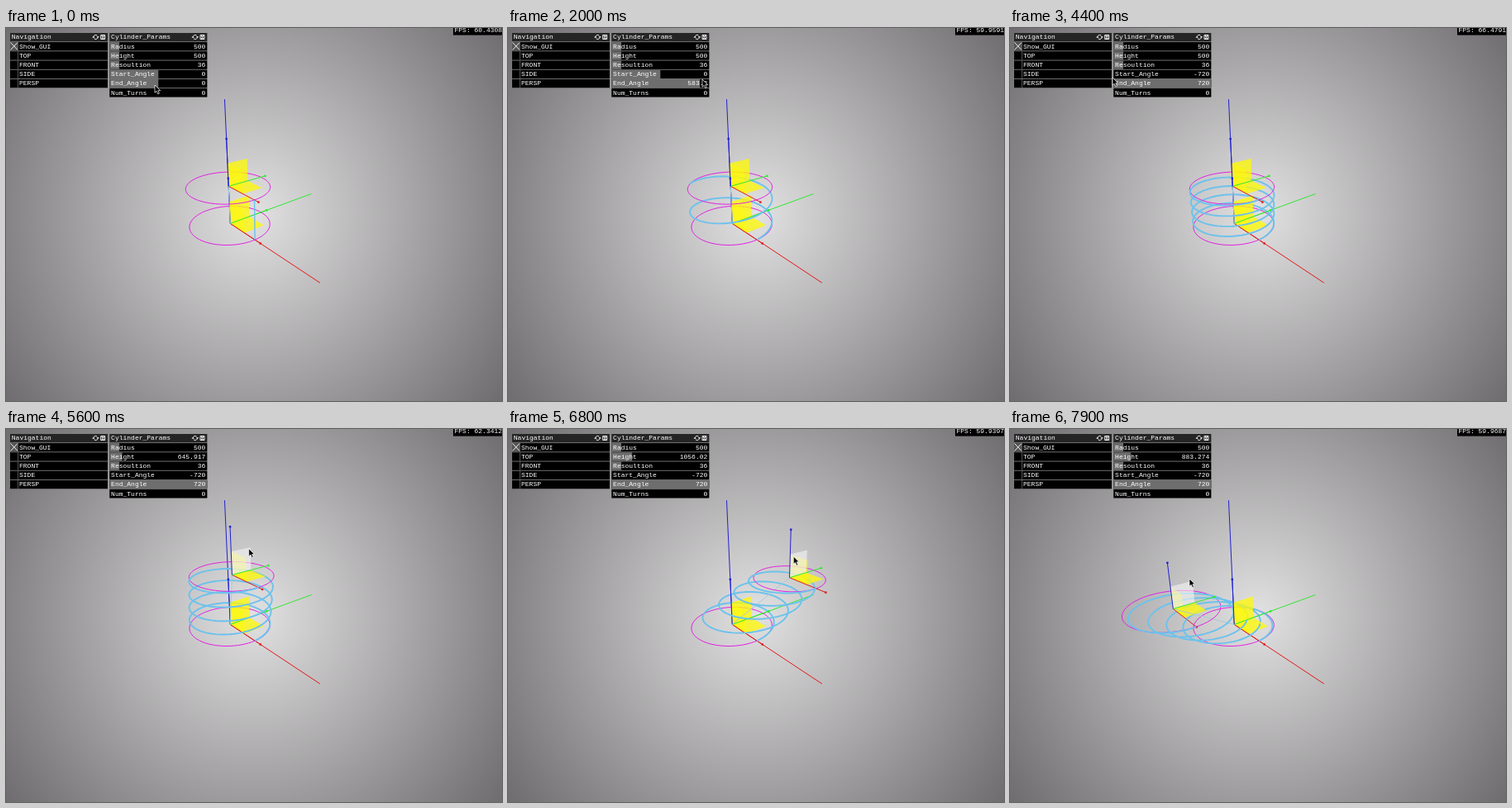
These frames come from a looping animation (600x451 px, 8000 ms). An HTML page with a canvas:

```html
<!DOCTYPE html>
<html lang="en">
<head>
<meta charset="utf-8">
<title>Cylinder params</title>
<style>
  html, body { margin: 0; width: 100%; height: 100%; overflow: hidden; background: #888; }
  canvas, svg { position: absolute; left: 0; top: 0; width: 600px; height: 451px; }
  canvas { background: radial-gradient(circle 376px at 300px 225px, #e2e1e2, #6e6c6e); }
  text { font: 8px "Liberation Mono", "DejaVu Sans Mono", monospace; fill: #fff; white-space: pre; }
  .value { text-anchor: end; }
  .line { fill: none; stroke: #eee; }
</style>
</head>
<body>
<canvas id="scene" width="600" height="451"></canvas>
<svg id="gui" viewBox="0 0 600 451">
  <defs>
    <g id="icons" class="line">
      <path d="M-2.6 .6A2.6 2.6 0 0 1 1.8-1.8M2.6-.6A2.6 2.6 0 0 1-1.8 1.8M-4 .2h2.6M1.4-.2H4"/>
      <path d="M6.2-2.5h5v5h-5zM7.7-2.5v2h2v-2M7.7 2.5v-1.5h2v1.5"/>
    </g>
  </defs>
  <g id="panels"></g>
  <rect x="541" width="59" height="8.6"/>
  <text id="fps" x="542.5" y="5.3"></text>
  <path id="cursor" d="M0 0V9.2L2.2 7.3 3.8 10.8 5.4 10.1 3.9 6.7H6.8Z" fill="#000" stroke="#fff" stroke-width=".7"/>
</svg>
<script>
const LOOP = 8000, STEP = 100, ROW = 11.2, BAR = 118;
const $ = id => document.getElementById(id);
const ctx = $('scene').getContext('2d');

// Keys: time, then values
const cursorKeys = [[0, 180, 69], [400, 183, 67], [2000, 235, 62], [2400, 243, 63], [2700, 235, 60],
  [3200, 183, 55], [4300, 125, 58], [4400, 124, 60], [5200, 289, 160], [6300, 302, 118],
  [7200, 380, 183], [7900, 217, 181]];
const topKeys = [[5200, 0, 1], [6300, .312, 1.78881883], [7200, 3.27244, 0], [7900, -1.525, .8916652]];
const endKeys = [[400, 0], [2000, 583.2], [2400, 720]];
const startKeys = [[3300, 0], [4300, -720]];
const fpsKeys = [[0, 60.4308], [2000, 59.9591], [3200, 66.5424], [4400, 66.4791],
  [6300, 59.9275], [7200, 59.9494], [7900, 59.9687]];

function at(keys, t) {
  const i = keys.findIndex(k => k[0] >= t);
  if (i < 0) return keys[keys.length - 1].slice(1);
  if (i === 0) return keys[0].slice(1);
  const a = keys[i - 1], b = keys[i], u = (t - a[0]) / (b[0] - a[0]);
  return a.slice(1).map((v, j) => v + (b[j + 1] - v) * u);
}

// Static panels
function add(tag, attrs, text = '') {
  const el = document.createElementNS('http://www.w3.org/2000/svg', tag);
  for (const k in attrs) el.setAttribute(k, attrs[k]);
  el.textContent = text;
  return $('panels').appendChild(el);
}
const rowTop = i => 17.1 + ROW * i;
const baseline = i => 24.6 + ROW * i;

function panel(x, title, count) {
  add('rect', { x, y: 6, width: BAR, height: 10.7 + ROW * count, fill: '#7c7c7c' });
  add('rect', { x, y: 6, width: BAR, height: 10.2, fill: '#252525' });
  add('text', { x: x + 1.8, y: 13.4 }, title);
  add('use', { href: '#icons', x: x + 103.5, y: 11 });
  for (let i = 0; i < count; i++)
    add('rect', { x, y: rowTop(i), width: BAR, height: ROW - .9, fill: '#000' });
}

const views = ['Show_GUI', 'TOP', 'FRONT', 'SIDE', 'PERSP'];
panel(5, 'Navigation', views.length);
add('rect', { x: 5, y: rowTop(0), width: 9.5, height: ROW - .9, fill: '#555' });
add('path', { d: 'M5.5 17.5l8.5 9M14 17.5l-8.5 9', class: 'line' });
views.forEach((v, i) => {
  add('rect', { x: 14, y: rowTop(i), width: .8, height: ROW - .9, fill: '#666' });
  add('text', { x: 16, y: baseline(i) }, v);
});

const params = [['Radius', 0, 5000], ['Height', 0, 5000], ['Resoultion', 0, 360],
  ['Start_Angle', -720, 720], ['End_Angle', -720, 720], ['Num_Turns', 0, 100]];
panel(125.3, 'Cylinder_Params', params.length);
const sliders = params.map(([name, min, max], i) => {
  const bar = add('rect', { x: 125.3, y: rowTop(i), height: ROW - .9, fill: '#6e6e6e' });
  add('text', { x: 127.1, y: baseline(i) }, name);
  const label = add('text', { x: 241.3, y: baseline(i), class: 'value' });
  return v => {
    bar.setAttribute('width', BAR * (v - min) / (max - min));
    label.textContent = +v.toPrecision(6);
  };
});

// Camera: one unit is the cylinder radius
const depth = ([x, y, z]) => 1 - .081 * x + .073 * y - .0476 * z;
function project(p) {
  const [x, y, z] = p, w = depth(p);
  return [271.3 + (27.4 * x + 39.9 * y - 1.95 * z) / w,
          236.4 + (18.1 * x - 14.6 * y - 42.9 * z) / w];
}
const sum = (a, b) => a.map((v, i) => v + b[i]);

function path(points) {
  ctx.beginPath();
  points.forEach(p => ctx.lineTo(...project(p)));
}
function stroke(points, color, width) {
  path(points);
  ctx.strokeStyle = color;
  ctx.lineWidth = width;
  ctx.stroke();
}

// Points around the line from the origin to the top, from angle a to b
function coil(top, a, b, from, to, n) {
  return Array.from({ length: n + 1 }, (_, i) => {
    const u = i / n, s = from + (to - from) * u, r = (a + (b - a) * u) * Math.PI / 180;
    return { p: [Math.cos(r), Math.sin(r) + top[1] * s, top[2] * s],
             back: .073 * Math.sin(r) > .081 * Math.cos(r) };
  });
}
function strokeSide(points, back, color, width) {
  ctx.beginPath();
  let open = false;
  for (let i = 1; i < points.length; i++) {
    if (points[i].back === back) {
      if (!open) ctx.moveTo(...project(points[i - 1].p));
      ctx.lineTo(...project(points[i].p));
      open = true;
    } else open = false;
  }
  ctx.strokeStyle = color;
  ctx.lineWidth = width;
  ctx.stroke();
}

const axes = [[[1, 0, 0], '#e01818'], [[0, 1, 0], '#30e830'], [[0, 0, 1], '#2020d0']];

function square(o, u, v, size, color) {
  const a = u.map(k => k * size), b = v.map(k => k * size);
  path([o, sum(o, a), sum(sum(o, a), b), sum(o, b)]);
  ctx.fillStyle = color;
  ctx.fill();
}
function planes(o, held) {
  const s = .6 * depth(o), [x, y, z] = axes.map(a => a[0]);
  square(o, x, z, s, 'rgba(255,250,0,.5)');
  square(o, x, y, s, 'rgba(255,250,0,.75)');
  square(o, y, z, s, held ? 'rgba(245,245,245,.6)' : 'rgba(255,250,0,.75)');
}
function arrows(o) {
  const size = 1.2 * depth(o);
  for (const [dir, color] of axes) {
    const tip = sum(o, dir.map(k => k * size)), [x, y] = project(tip);
    stroke([o, tip], color, 1);
    ctx.fillStyle = color;
    ctx.fillRect(x - 1.2, y - 1.2, 2.4, 2.4);
  }
}

function draw(t) {
  const origin = [0, 0, 0], top = [0, ...at(topKeys, t)];
  const [end] = at(endKeys, t), [start] = at(startKeys, t);
  const curves = [
    [coil(top, 0, 360, 0, 0, 72), '#e020e0', 1],
    [coil(top, 0, 360, 1, 1, 72), '#e020e0', 1],
    [coil(top, start, end, 0, 1, 240), '#6cc2ec', end - start ? 1.9 : 1.4]
  ];

  ctx.clearRect(0, 0, 600, 451);
  for (const [dir, color] of axes) stroke([origin, dir.map(k => k * 3)], color, 1);
  curves.forEach(([pts, color, width]) => strokeSide(pts, true, color, width));
  planes(origin, false);
  planes(top, t >= 5200);
  arrows(origin);
  stroke([origin, top], '#a4ccd8', 1);
  arrows(top);
  curves.forEach(([pts, color, width]) => strokeSide(pts, false, color, width));

  const values = [500, 500 * Math.hypot(...top), 36, start, end, 0];
  sliders.forEach((set, i) => set(values[i]));
  $('fps').textContent = 'FPS: ' + at(fpsKeys, t)[0].toFixed(4);
  $('cursor').setAttribute('transform', `translate(${at(cursorKeys, t)})`);
}

let begin, shown = -1;
function tick(now) {
  begin ??= now;
  const t = Math.floor((now - begin) % LOOP / STEP) * STEP;
  if (t !== shown) draw(shown = t);
  requestAnimationFrame(tick);
}
draw(0);
requestAnimationFrame(tick);
</script>
</body>
</html>
```
